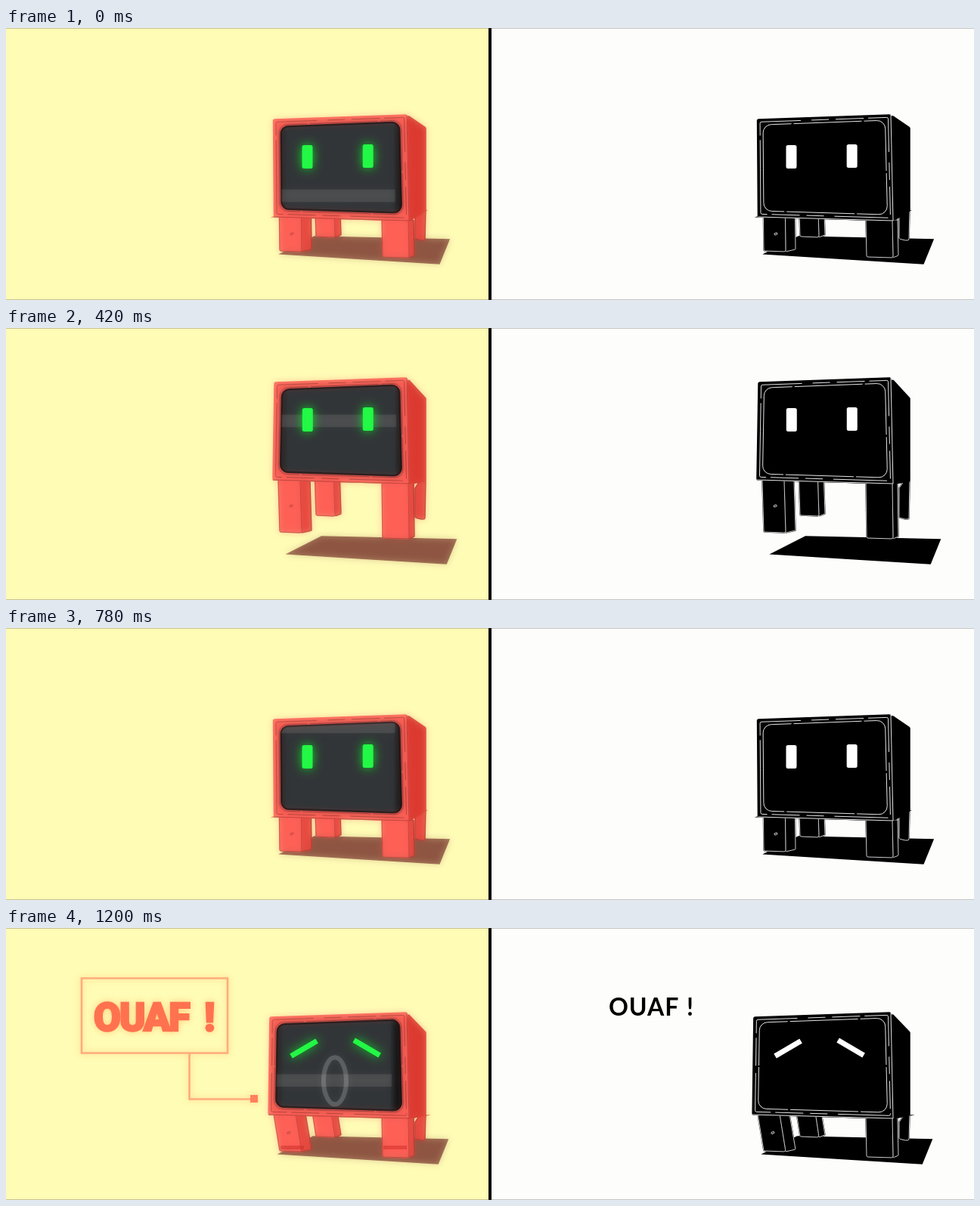
An HTML page with a canvas for the animation above (1.23 s loop, 1280 by 360 pixels).

```html
<!DOCTYPE html>
<html lang="fr">
<head>
<meta charset="utf-8">
<title>Robot dog</title>
<style>
  html, body { margin: 0; width: 100%; height: 100%; overflow: hidden; background: #fdfdfc; }
  canvas, svg { position: absolute; left: 0; top: 0; width: 1280px; height: 360px; }
  .glow { filter: drop-shadow(0 0 4px #ffcb7c); }
  .shout { font: 900 52px Roboto, sans-serif; letter-spacing: -2px; fill: #ff7250; stroke: #ff7250; stroke-width: 2.4; }
  .plain { font: 700 32px Lato, sans-serif; letter-spacing: 1px; }
</style>
</head>
<body>
<canvas id="stage" width="1280" height="360"></canvas>
<svg id="bark" viewBox="0 0 1280 360" visibility="hidden">
  <g class="glow">
    <path d="M100 66.5H293V165.5H100ZM242.5 166V226.5H324" fill="none" stroke="#ffab7c" stroke-width="2.6"/>
    <rect x="323" y="221" width="10" height="10" fill="#ff805e"/>
    <g class="shout"><text x="116" y="136">OUAF</text><text x="262" y="136">!</text></g>
  </g>
  <g class="plain"><text x="797" y="116">OUAF</text><text x="900" y="116">!</text></g>
</svg>
<script>
const LOOP = 1230, STEP = 30, BARK = 1050;
const stage = document.getElementById('stage');
const ctx = stage.getContext('2d');
const bark = document.getElementById('bark');

// time, body top, pitch, slide, front lift, rear lift
const KEYS = [
  [0, 115, 17, 354, 0, 0],
  [210, 129, 0, 352, 0, 0],
  [330, 85, 47, 355, 5, 0],
  [420, 66, 27, 354, 25, 28],
  [510, 104, 0, 353, 0, 31],
  [630, 133, 0, 353, 0, 0],
  [780, 115, 17, 354, 0, 0],
  [960, 132, 0, 357, 0, 0],
  [1080, 112, 26, 348, 0, 0],
  [LOOP, 112, 26, 348, 0, 0]
];

const LEFT = {
  x: 0, ground: '#8f5642', front: '#fe6056', side: '#dc3b32', leg: '#fe6157',
  legSide: '#e84a40', belly: '#d5382f', screen: '#333638', line: 'rgba(84,28,26,.55)', eye: '#22f845'
};
const RIGHT = {
  x: 640, ground: '#000', front: '#000', side: '#000', leg: '#000',
  legSide: '#000', belly: '#000', screen: '#000', line: '#fff', eye: '#fff'
};

// Monotone curve through the keys: flat at every extreme, no overshoot.
function slope(k, i) {
  if (k < 1 || k > KEYS.length - 2) return 0;
  const [a, b, c] = KEYS.slice(k - 1, k + 2);
  const s = (b[i] - a[i]) / (b[0] - a[0]);
  const r = (c[i] - b[i]) / (c[0] - b[0]);
  return s * r > 0 ? 2 * s * r / (s + r) : 0;
}

function poseAt(t) {
  let k = 0;
  while (t >= KEYS[k + 1][0]) k++;
  const a = KEYS[k], b = KEYS[k + 1];
  const d = b[0] - a[0], u = (t - a[0]) / d, v = 1 - u;
  return a.map((n, i) =>
    v * v * (1 + 2 * u) * n + u * u * (3 - 2 * u) * b[i] +
    u * v * d * (v * slope(k, i) - u * slope(k + 1, i))).slice(1);
}

const ramp = (t, a, b) => Math.min(1, Math.max(0, (t - a) / (b - a)));

function shape(pts, r = 0) {
  const n = pts.length, last = pts[n - 1];
  ctx.beginPath();
  ctx.moveTo((last[0] + pts[0][0]) / 2, (last[1] + pts[0][1]) / 2);
  pts.forEach((p, i) => ctx.arcTo(...p, ...pts[(i + 1) % n], r));
  ctx.closePath();
}

function line(...pts) {
  ctx.beginPath();
  pts.forEach(p => ctx.lineTo(...p));
  ctx.stroke();
}

function leg(x, y, w, depth, fx, fy) {
  const a = x + w, fa = fx + w;
  return [
    { tone: 'legSide', r: 1, pts: [[a, y], [a + depth, y], [fa + depth, fy - 2], [fa, fy + 1]] },
    { tone: 'leg', r: 2, pts: [[x, y], [a, y], [fa, fy + 1], [fx, fy]] }
  ];
}

function build([top, pitch, slide, front, rear]) {
  const lean = (.3 * pitch - 6) / 2;
  const left = slide - lean, bottom = top + 140, low = bottom - 5;
  const back = bottom - 30 + pitch, floor = 281 - rear;
  const face = [[slide + lean, top + 6], [530, top], [533, bottom], [left, low]];
  const inset = k => face.map(([x, y], i) => [x + (i % 3 ? -10 : 10) * k, y + (i < 2 ? 9.5 : -10.5) * k]);
  const shift = .15 * rear + .2 * front + .3 * (slide - 354);
  const rearTop = Math.min(low + Math.max(0, pitch - 32), 274 - rear);
  return {
    face, pitch, inner: inset(.35), rim: inset(.75), screen: inset(1),
    mark: [left * .55 + 183, (low + 295 - front) / 2],
    parts: [
      { tone: 'ground', pts: [[363, 299], [408, 276], [586, 280], [573, 312]].map(([x, y]) => [x + shift, y]) },
      ...leg(409 + (left - 354) / 2, rearTop, 25, 8, 410, 276 - rear),
      { tone: 'belly', pts: [[left, low], [533, bottom], [555, back], [left + 50, low - 31 + pitch]] },
      { tone: 'legSide', r: 2, pts: [[541, floor - 2], [541, back + 9], [547, back], [555, back - 3], [554, floor], [549, floor]] },
      ...leg(left + 7, low, 29, 13, 362, 295 - front),
      ...leg(497, bottom - 1, 35, 7, 498, 303 - front),
      { tone: 'side', r: 2, pts: [[530, top], [555, top + pitch], [555, back], [533, bottom]] },
      { tone: 'front', r: 2, pts: face }
    ]
  };
}

function onScreen([a, b, c, d], u, v) {
  return [0, 1].map(i => (a[i] * (1 - u) + b[i] * u) * (1 - v) + (d[i] * (1 - u) + c[i] * u) * v);
}

function eye(t, side) {
  if (t >= 120 && t < 270) {
    ctx.lineWidth = 9;
    for (const s of [-1, 1]) line([1 + s * 21, -19], [1 - s * 13, 7]);
  } else if (t >= 1020) {
    ctx.lineWidth = 7;
    line([-17, -8 + side * 10], [17, -8 - side * 10]);
  } else {
    const close = ramp(t, 885, 975);
    const w = 14 - 2 * close, h = 31 - 25 * close;
    ctx.beginPath();
    ctx.roundRect(-w / 2, -h / 2, w, h, 2.5);
    ctx.fill();
  }
}

function eyes(t, quad, look) {
  for (const side of [1, -1]) {
    const [x, y] = onScreen(quad, .475 - side * .255, .37);
    ctx.save();
    ctx.translate(look.x + x, y);
    ctx.fillStyle = ctx.strokeStyle = look.eye;
    if (look === LEFT) {
      ctx.shadowColor = '#0fdc28';
      ctx.shadowBlur = 14;
    }
    eye(t, side);
    ctx.restore();
  }
}

function glass(t, { screen, pitch }) {
  const [[x, y]] = screen;
  ctx.save();
  shape(screen, 10);
  ctx.clip();
  const shade = ctx.createLinearGradient(x, 0, x + 165, 0);
  shade.addColorStop(0, 'rgba(0,0,0,.3)');
  shade.addColorStop(.05, 'rgba(0,0,0,0)');
  shade.addColorStop(.9, 'rgba(0,0,0,0)');
  shade.addColorStop(.96, 'rgba(0,0,0,.65)');
  rect(shade, x - 20, y - 20, 210, 160);

  // the scan band climbs and wraps around
  const band = (114 - t * .117 - pitch * .1 + 124) % 124 - 21;
  rect('rgba(255,255,255,.12)', x - 10, y + band - 8, 161, 16.5);

  const [mx, my] = onScreen(screen, .47, .68);
  ctx.strokeStyle = 'rgba(225,225,225,.28)';
  ctx.lineWidth = 6;
  ctx.beginPath();
  ctx.ellipse(mx, my, 15, 31 * ramp(t, 1005, 1080), 0, 0, 7);
  if (t > 1005) ctx.stroke();
  ctx.restore();
}

function robot(t, body, look) {
  const { parts, face, inner, rim, screen, mark } = body;
  ctx.save();
  ctx.translate(look.x, 0);
  ctx.lineWidth = 1.5;
  for (const { pts, tone, r } of parts) {
    ctx.fillStyle = ctx.strokeStyle = look[tone];
    shape(pts, r);
    ctx.fill();
    ctx.stroke();
    if (!tone.startsWith('leg')) continue;
    ctx.strokeStyle = look.line;
    ctx.lineWidth = .8;
    ctx.stroke();
    ctx.lineWidth = 1.5;
  }

  // sketchy edges
  ctx.strokeStyle = look.line;
  ctx.lineWidth = .9;
  line(...face.slice(1));
  ctx.setLineDash([37, 6, 71, 14, 23, 9]);
  shape(inner, 2);
  ctx.stroke();
  ctx.setLineDash([90, 3]);
  shape(rim, 11);
  ctx.stroke();
  ctx.setLineDash([]);
  ctx.beginPath();
  ctx.ellipse(...mark, 2.2, 1.2, -.3, 0, 7);
  ctx.stroke();

  ctx.fillStyle = look.screen;
  shape(screen, 10);
  ctx.fill();
  if (look === LEFT) {
    ctx.strokeStyle = '#141517';
    ctx.lineWidth = 2.5;
    ctx.stroke();
    glass(t, body);
    // shaded toes while barking
    if (t >= BARK) for (const x of [363, 499]) rect('rgba(205,40,35,.6)', x, 288, 31, 5);
  }
  ctx.restore();
}

// Soft light: the left half laid over itself, blurred.
function bloom() {
  ctx.save();
  ctx.beginPath();
  ctx.rect(0, 0, 640, 360);
  ctx.clip();
  ctx.globalAlpha = .3;
  ctx.filter = 'blur(4px)';
  ctx.drawImage(stage, 0, 0);
  ctx.restore();
}

function rect(color, x, y, w, h) {
  ctx.fillStyle = color;
  ctx.fillRect(x, y, w, h);
}

function draw(now) {
  const t = Math.floor(now % LOOP / STEP) * STEP;
  const body = build(poseAt(t));
  rect('#fffcb6', 0, 0, 1280, 360);
  robot(t, body, LEFT);
  bloom();
  rect('#fdfdfc', 640, 0, 640, 360);
  robot(t, body, RIGHT);
  for (const look of [LEFT, RIGHT]) eyes(t, body.screen, look);
  rect('#000', 638, 0, 4, 360);
  for (const y of [0, 359]) rect('rgba(90,90,90,.35)', 0, y, 1280, 1);
  bark.setAttribute('visibility', t >= BARK ? 'visible' : 'hidden');
}

let start;
function tick(now) {
  start ??= now;
  draw(now - start);
  requestAnimationFrame(tick);
}
draw(0);
requestAnimationFrame(tick);
</script>
</body>
</html>
```
